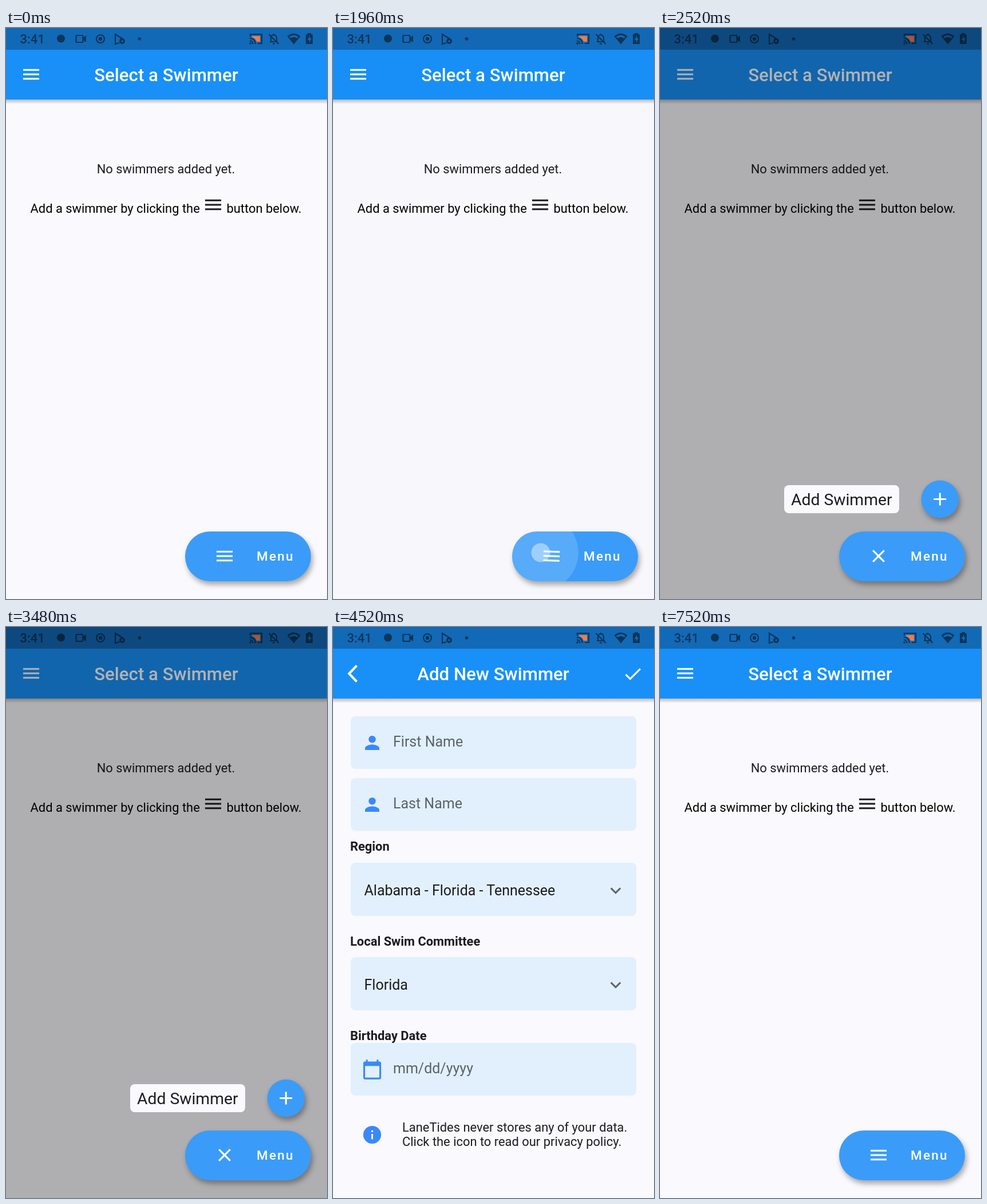
These frames come from a looping animation (561 px wide and 998 px high, 8480 ms). An HTML page:

```html
<!DOCTYPE html>
<html lang="en">
<head>
<meta charset="utf-8">
<title>Add a swimmer</title>
<style>
html, body { margin: 0; width: 100%; height: 100%; overflow: hidden; background: #faf9fd }
svg { display: block; width: 561px; height: 998px; font-family: Roboto, "Noto Sans", sans-serif }
.raised { filter: drop-shadow(3px 6px 5px #0005) }
</style>
</head>
<body>
<svg id="stage" viewBox="0 0 561 998"></svg>
<script>
const INK = '#1c1b1f', BLUE = '#3a9cf8', ICON_BLUE = '#3a88fc', STATUS = '#0d3558', PAPER = '#faf9fd';
const LOOP = 8480, STEP = 40;

// 24-unit icon shapes, drawn at 1.56 px per unit
const ICONS = {
  menu: 'M3 18h18v-2H3zm0-5h18v-2H3zm0-7v2h18V6z',
  close: 'M19 6.4 17.6 5 12 10.6 6.4 5 5 6.4 10.6 12 5 17.6 6.4 19 12 13.4 17.6 19 19 17.6 13.4 12z',
  add: 'M19 13h-6v6h-2v-6H5v-2h6V5h2v6h6z',
  check: 'M9 16.2 4.8 12 3.4 13.4 9 19 21 7 19.6 5.6z',
  down: 'M7.4 8.3 12 12.9 16.6 8.3 18 9.7 12 15.7 6 9.7z',
  person: 'M12 12a4 4 0 1 0 0-8 4 4 0 0 0 0 8zm0 2c-2.7 0-8 1.3-8 4v2h16v-2c0-2.7-5.3-4-8-4z',
  calendar: 'M20 3h-1V1h-2v2H7V1H5v2H4a2 2 0 0 0-2 2v16a2 2 0 0 0 2 2h16a2 2 0 0 0 2-2V5a2 2 0 0 0-2-2zm0 18H4V8h16z',
  info: 'M12 2a10 10 0 1 0 0 20 10 10 0 0 0 0-20zm1 15h-2v-6h2zm0-8h-2V7h2z'
};

const icon = (name, x, y, fill, id = '') =>
  `<g transform="translate(${x} ${y}) scale(1.56)"><path id="${id}" transform="translate(-12 -12)" d="${ICONS[name]}" fill="${fill}"/></g>`;
const text = (s, x, y, size, fill = INK, attrs = '') =>
  `<text x="${x}" y="${y}" font-size="${size}" fill="${fill}" ${attrs}>${s}</text>`;
const title = s => text(s, 280, 93, 31.2, '#fff', 'font-weight="500" text-anchor="middle"');
const heading = (s, y) => text(s, 30, y, 21.9, INK, 'font-weight="700"');
const card = (y, h) => `<rect x="31" y="${y}" width="499" height="${h}" rx="8" fill="#e2f0fd"/>`;
const field = (y, name, hint) =>
  card(y, 92) + icon(name, 68.5, y + 46.5, ICON_BLUE) + text(hint, 105, y + 53, 25, '#5b6369');
const select = (y, value) => card(y, 93) + text(value, 54.5, y + 57, 25) + icon('down', 494, y + 49, '#5f6468');
const touch = id => `<circle id="${id}" r="16.5" fill="#fff"/>`;

const statusBar = `
  <rect width="561" height="38" fill="#1269b6"/>
  ${text('3:41', 24.5, 27, 22, STATUS, 'font-weight="500"')}
  <g fill="${STATUS}">
    <circle cx="96" cy="18.5" r="7"/>
    <path d="M135 17l5-4v12l-5-4z"/>
    <circle cx="165" cy="19" r="3.2"/>
    <circle cx="203" cy="23" r="5"/>
    <circle cx="233.5" cy="19" r="2.8"/>
    <path d="M491.500 14.500Q503 4.500 514.500 14.500L503 28.500z"/>
    <path d="M527 9h6v2h3v17h-12V11h3z"/>
  </g>
  <path d="M495 15.500Q503 9.500 511 15.500L509 18Q503 14 497 18z" fill="#1269b6"/>
  <path d="M531 13l-4 8h3v5l4-8h-3z" fill="#1269b6"/>
  <circle cx="203" cy="23" r="1.700" fill="#1269b6"/>
  <path d="M430 14h14v10h-6q-2-6-8-8z" fill="#f47a48"/>
  <g fill="none" stroke="${STATUS}" stroke-width="2.200">
    <rect x="122.500" y="13" width="12" height="12" rx="1"/>
    <circle cx="165" cy="19" r="7"/>
    <path d="M198 26l-7 2V11l13 8"/>
    <path d="M427 15v-4h20v16h-7M426 18q9 0 10 10M426 22.500q5 0 5.500 5.500"/>
    <path d="M461 24h14M463 24v-7q1-5 5-5t5 5v7M468 12v-2M466 27.500h4M459.500 11l17 17"/>
  </g>
  <circle cx="427" cy="27" r="1.800" fill="${STATUS}"/>`;

const appBar = `
  <rect y="125" width="561" height="8" fill="url(#barShadow)"/>
  <rect y="38" width="561" height="87" fill="#1890f8"/>`;

const home = `
  ${title('Select a Swimmer')}
  ${icon('menu', 44, 81, '#fff')}
  ${text('No swimmers added yet.', 158.7, 254, 21.9)}
  ${text('Add a swimmer by clicking the', 42.5, 323, 21.9, '#000')}
  ${icon('menu', 362, 309, INK)}
  ${text('button below.', 385.5, 323, 21.9, '#000')}
  <rect id="shade" width="561" height="998"/>
  <g id="label">
    <rect x="217" y="799" width="201" height="49" rx="8" fill="${PAPER}"/>
    ${text('Add Swimmer', 229, 834, 28.3)}
  </g>
  <g id="mini" class="raised">
    <circle r="32.800" fill="${BLUE}"/>
    ${icon('add', 0, 0, '#fff')}
  </g>
  <rect class="raised" x="313" y="880" width="220" height="87" rx="43.500" fill="${BLUE}"/>
  <g clip-path="url(#pill)"><circle id="ripple" cx="363" cy="917" fill="#fff"/></g>
  ${touch('menuTouch')}
  ${icon('menu', 382, 923, '#fff', 'menuIcon')}
  ${text('Menu', 438, 931, 22.5, '#fff', 'font-weight="500" letter-spacing="2.2"')}
  ${touch('addTouch')}`;

const form = `
  ${title('Add New Swimmer')}
  <path d="M41.500 67.500L28 81.500l13.500 14" fill="none" stroke="#fff" stroke-width="4"/>
  ${icon('check', 524, 82, '#fff')}
  ${field(156, 'person', 'First Name')}
  ${field(264, 'person', 'Last Name')}
  ${heading('Region', 391)}
  ${select(412, 'Alabama - Florida - Tennessee')}
  ${heading('Local Swim Committee', 557)}
  ${select(577, 'Florida')}
  ${heading('Birthday Date', 722)}
  ${field(727, 'calendar', 'mm/dd/yyyy')}
  ${icon('info', 68.5, 887.5, ICON_BLUE)}
  ${text('LaneTides never stores any of your data.', 121, 882, 21.9)}
  ${text('Click the icon to read our privacy policy.', 121, 907, 21.9)}`;

const $ = id => document.getElementById(id);
$('stage').innerHTML = `
  <defs>
    <linearGradient id="barShadow" x2="0" y2="1">
      <stop stop-opacity=".25"/><stop offset="1" stop-opacity="0"/>
    </linearGradient>
    <clipPath id="pill"><rect x="313" y="880" width="220" height="87" rx="43.500"/></clipPath>
  </defs>
  <rect width="561" height="998" fill="${PAPER}"/>
  ${appBar}${statusBar}
  <g id="home">${home}</g>
  <g id="form">${form}</g>`;

const ramp = (t, a, b) => Math.min(1, Math.max(0, (t - a) / (b - a)));
const pulse = (t, a, b, c, d) => ramp(t, a, b) * (1 - ramp(t, c, d));
const set = (id, attr, value) => $(id).setAttribute(attr, value);
const show = (id, on) => set(id, 'display', on ? 'inline' : 'none');

set('menuTouch', 'transform', 'translate(363 917)');
set('addTouch', 'transform', 'translate(489 824)');

function draw(t) {
  const onForm = t >= 3840 && t < 6800;
  show('home', !onForm);
  show('form', onForm);

  const open = t < 3840 ? ramp(t, 1957, 2107) : 0;
  set('shade', 'opacity', t < 3720 ? open * 0.3 : 0);
  show('label', open === 1 && t < 3720);
  show('mini', open > 0);
  set('mini', 'transform', `translate(489.3 823.5) scale(${open ** 3.3})`);
  set('menuIcon', 'd', open < 0.5 ? ICONS.menu : ICONS.close);
  set('menuIcon', 'transform', `rotate(${open * 90}) translate(-12 -12)`);

  set('ripple', 'r', Math.max(0, Math.min(230, (t - 1901) * 1.115)));
  set('ripple', 'opacity', 0.15 - 0.08 * ramp(t, 2040, 2120) - 0.07 * ramp(t, 2340, 2500));
  set('menuTouch', 'opacity', 0.42 * pulse(t, 1780, 1880, 1960, 2060));
  set('addTouch', 'opacity', 0.42 * pulse(t, 3220, 3300, 3380, 3480));
}

const start = performance.now();
function tick() {
  const t = (performance.now() - start) % LOOP;
  draw(t - t % STEP);
  requestAnimationFrame(tick);
}
tick();
</script>
</body>
</html>
```
